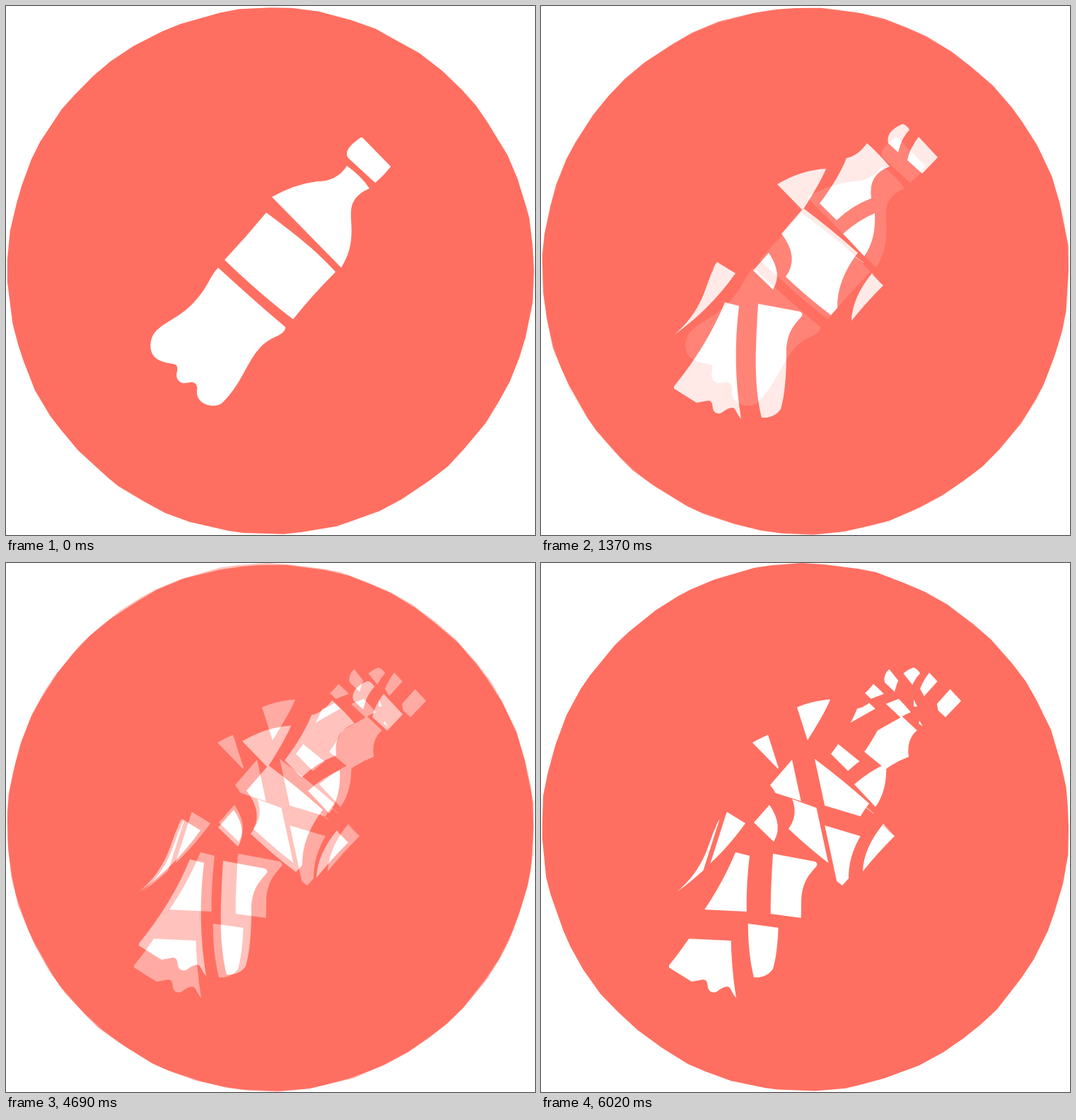
Animation, 748 px wide and 748 px high, one loop 8 s. Source, as an HTML page with a canvas:

```html
<!DOCTYPE html>
<html lang="en">
<head>
<meta charset="utf-8">
<title>Bottle breaking into pieces</title>
<style>
html, body { margin: 0; height: 100%; overflow: hidden; background: #fff; }
canvas { display: block; width: 100vw; height: 100vh; }
</style>
</head>
<body>
<canvas id="stage" width="748" height="748"></canvas>
<script>
const SIZE = 748, LOOP = 8000, CORAL = '#ff6f61';
const path = d => new Path2D(d);

function jaggedDisc(ctx, seed, cy, radius) {
  const random = () => (seed = seed * 16807 % 2147483647) / 2147483647;
  const count = 62;
  ctx.fillStyle = CORAL;
  ctx.beginPath();
  for (let i = 0; i < count; i++) {
    const angle = (i + random() * .6) / count * 2 * Math.PI;
    const r = radius - random() * 2;
    ctx.lineTo(374 + r * Math.cos(angle), cy + r * Math.sin(angle));
  }
  ctx.fill();
}

function makePose(seed, cy, radius, drawPieces) {
  const canvas = document.createElement('canvas');
  canvas.width = canvas.height = SIZE;
  const ctx = canvas.getContext('2d');
  ctx.fillStyle = '#fff';
  ctx.fillRect(0, 0, SIZE, SIZE);
  jaggedDisc(ctx, seed, cy, radius);
  ctx.fillStyle = '#fff';
  drawPieces(ctx);
  return canvas;
}

// Keeps only what lies to the right of someone walking along the line.
function clipBeside(ctx, [x1, y1, x2, y2]) {
  const angle = Math.atan2(y2 - y1, x2 - x1);
  ctx.translate(x1, y1);
  ctx.rotate(angle);
  ctx.beginPath();
  ctx.rect(-SIZE, 0, 2 * SIZE, SIZE);
  ctx.clip();
  ctx.rotate(-angle);
  ctx.translate(-x1, -y1);
}

function line(ctx, color, x1, y1, x2, y2) {
  ctx.strokeStyle = color;
  ctx.lineWidth = .8;
  ctx.beginPath();
  ctx.moveTo(x1, y1);
  ctx.lineTo(x2, y2);
  ctx.stroke();
}

// Whole bottle
const cap = path('M504 186L544 227Q533 241 522 250L484 215C475 203 498 189 500 187Q502 185 504 186');
const top_ = path('M482 226Q502 240 514 258 490 268 488 288C486 308 496 335 474 370L376 270Q408 252 440 248 468 248 482 226');
const label = path('M368 292C405 320 435 342 466 376Q432 410 406 443 360 408 309 359 340 326 368 292');
const base = path('M300 370Q350 416 395 454 396 460 385 466C360 476 352 490 335 521Q322 545 307 560 302 566 290 565C278 564 269 555 270 545Q272 534 264 532C256 532 255 534 249 533Q241 530 241 521 244 510 240 507C228 504 220 504 212 498 200 488 203 466 215 457 232 442 252 438 275 408 286 394 290 380 300 370');

// Pieces after the first break
const capLeft = path('M511 167Q516 167 521 175 510 186 505 207L491 194Q487 177 511 167');
const capRight = path('M534 185L561 214 539 237 518 218Q521 202 534 185');
const neck = path('M461 194Q477 208 493 227 462 238 467 272 440 282 418 303L394 279Q420 245 432 215 448 212 461 194');
const shoulderLeft = path('M334 252Q368 232 403 230 396 248 370 289');
const shoulderRight = path('M472 293Q474 330 457 354L427 322Q450 302 472 293');
const labelMid = path('M371 286Q410 315 448 349 418 388 419 427L410 437Q378 413 346 383 366 355 340 322');
const labelLeft = path('M322 349Q342 378 328 401L300 374');
const labelRight = path('M468 378L484 395Q460 419 439 445 440 412 468 378');
const sliver = path('M249 362L275 378Q238 430 188 465C230 430 232 395 243 374Q245 366 249 362');
const baseLeft = path('M260 419L280 424Q270 505 283 584C275 575 276 568 270 568 258 570 256 578 250 576 238 574 247 558 236 558L220 561 188 541V538Q235 480 260 419');
const baseRight = path('M307 421L366 432C380 440 347 444 347 490 347 520 345 550 339 570Q330 583 312 582C302 540 302 500 307 421');

const whole = makePose(11, 374.5, 373.5, ctx => [cap, top_, label, base].forEach(p => ctx.fill(p)));

const cracked = makePose(29, 374.5, 373.5, ctx => {
  [capLeft, capRight, neck, shoulderLeft, shoulderRight, labelMid,
    labelLeft, labelRight, sliver, baseLeft, baseRight].forEach(p => ctx.fill(p));
  line(ctx, CORAL, 469, 380, 483, 394);
  line(ctx, '#fff', 445, 355, 456, 363);
});

// Second break: each piece splits along straight cuts and its shards drift apart
const shattered = makePose(53, 373.5, 374, ctx => {
  const shard = (piece, dx, dy, ...cuts) => {
    ctx.save();
    ctx.translate(dx, dy);
    cuts.forEach(cut => clipBeside(ctx, cut));
    ctx.fill(piece);
    ctx.restore();
  };
  const flip = ([x1, y1, x2, y2]) => [x2, y2, x1, y1];
  const split = (piece, cut, [ax, ay], [bx, by]) => {
    shard(piece, ax, ay, cut);
    shard(piece, bx, by, flip(cut));
  };

  split(capLeft, [498, 176, 510, 191], [-5, -25], [15, -19]);

  const capCut = [527, 218, 545, 198];
  shard(capRight, 33, -19, capCut, [529, 231, 527, 219]);
  shard(capRight, 15, -30, flip(capCut), [526, 217, 521, 208]);
  ctx.fill(path('M527 193L532 203 527 203'));
  ctx.fill(path('M535 223L540 231 534 227'));

  const neckDown = [448, 206, 479, 235];
  const neckAcross = [419, 237, 458, 215];
  const neckTip = [458, 215, 476, 208];
  const neckLow = [403, 264, 435, 290];
  shard(neck, 9, -23, flip(neckDown), flip(neckTip));
  shard(neck, 30, -16, flip(neckDown), neckTip);
  shard(neck, 15, -9, neckDown, flip(neckAcross));
  shard(neck, 53, 2, neckDown, neckAcross, flip(neckLow));
  shard(neck, 16, -9, neckLow);

  split(shoulderLeft, [356, 241, 371, 288], [-35, 2], [6, -37]);
  shard(shoulderRight, 16, -9);

  const labelDown = [371, 286, 402, 430];
  const labelAcross = [385, 352, 435, 367];
  shard(labelMid, -16, -8, labelDown, [384, 345, 347, 333]);
  shard(labelMid, 4, -7, labelDown, [352, 341, 385, 353]);
  shard(labelMid, 16, -9, flip(labelDown), flip(labelAcross));
  shard(labelMid, 16, 19, flip(labelDown), labelAcross);
  shard(labelLeft, 1, -7);
  shard(labelRight, 16, -9);
  line(ctx, CORAL, 484, 371, 499, 385);
  line(ctx, '#fff', 459, 345, 470, 354);

  split(sliver, [248, 364, 226, 433], [4, 0], [14, -10]);
  split(baseLeft, [214, 500, 277, 503], [-7, 31], [15, -10]);
  split(baseRight, [304, 506, 348, 512], [-11, 4], [21, -10]);
});

// Both cross-fades advance in discrete steps of opacity.
function crackFade(t) {
  if (t < 500) return 0;
  if (t < 1370) return .07 + .079 * Math.min(9, Math.floor((t - 500) / 86.6));
  return t < 1445 ? .86 : t < 1520 ? .93 : 1;
}

function shatterFade(t) {
  if (t < 4150) return 0;
  if (t < 4840) return t < 4540 ? .4 : .42;
  if (t < 5470) return .48 + .103 * Math.min(4, Math.floor((t - 4840) / 120));
  return t < 6020 ? .96 : 1;
}

const stage = document.getElementById('stage').getContext('2d');

function draw() {
  const t = performance.now() % LOOP;
  const layers = [[whole, 1], [cracked, crackFade(t)], [shattered, shatterFade(t)]];
  for (const [pose, alpha] of layers) {
    stage.globalAlpha = alpha;
    stage.drawImage(pose, 0, 0);
  }
  requestAnimationFrame(draw);
}
draw();
</script>
</body>
</html>
```
